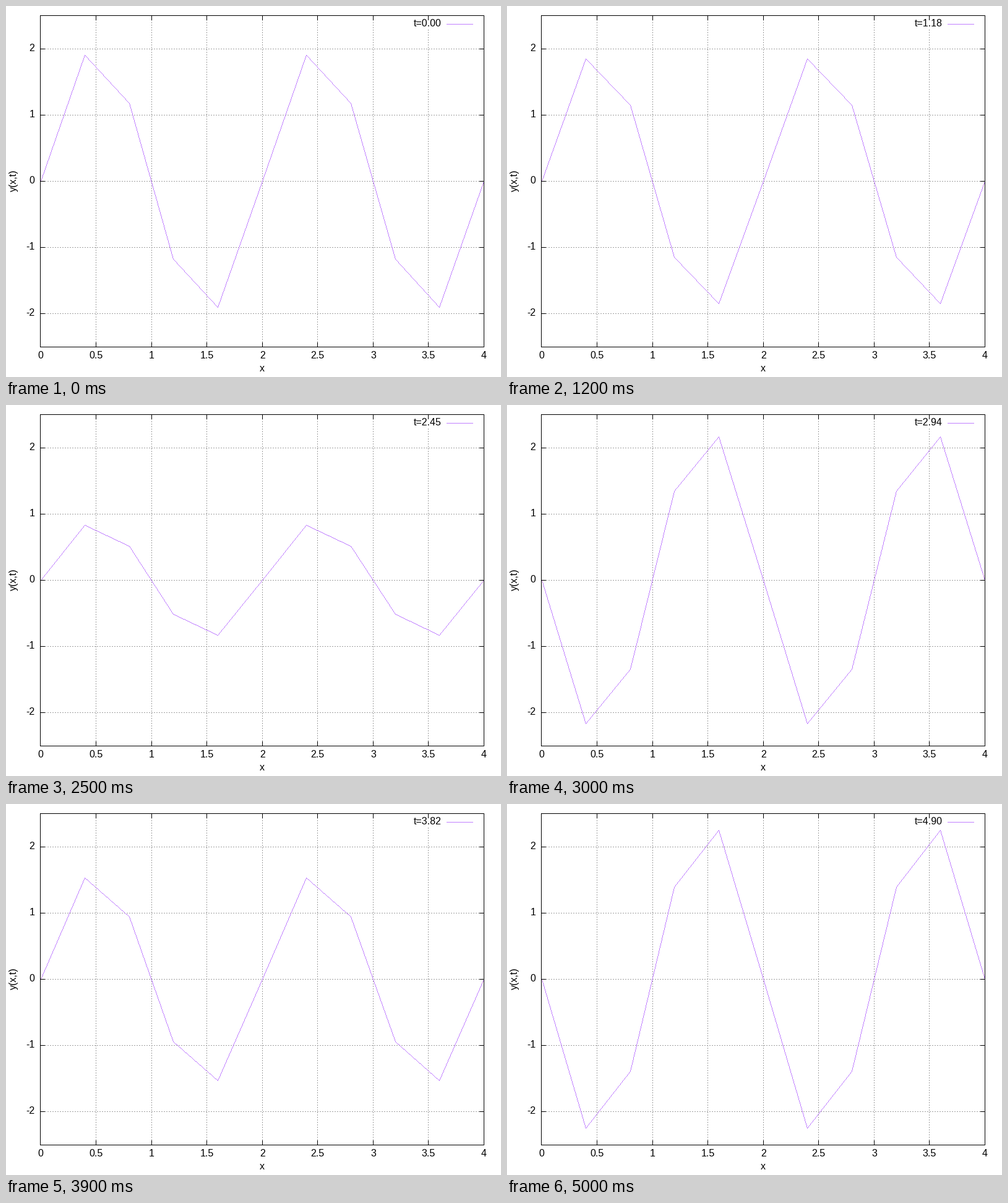
Write a matplotlib script that moves like this. It is 800 by 600 pixels and loops after 5100 ms.

```python
import numpy as np
import matplotlib.pyplot as plt
from matplotlib.animation import FuncAnimation

W, H, DPI = 800, 600, 100
FRAMES, INTERVAL = 51, 100
LEFT, RIGHT, TOP, BOTTOM = 55, 772, 15, 551
PX = 72 / DPI                      # one pixel in points
TICK = 7
INK, GRID, CURVE = "black", "#a0a0a0", "#c080ff"

# Damped, driven string on a coarse grid
DX, DT = 0.4, 0.098
SPEED, DAMPING, FORCE, OMEGA = 4, 6, 175.5, 3 * np.pi


def amplitudes():
    """Amplitude of the first mode at every time step, starting at rest."""
    g = DAMPING * DT / 2
    k = (SPEED * DT / DX) ** 2 * (2 - 2 * np.cos(np.pi * DX))
    a = [2.0, 2 - k]
    for n in range(1, FRAMES - 1):
        push = FORCE * DT**2 * np.sin(OMEGA * n * DT)
        a.append(((2 - k) * a[n] - (1 - g) * a[n - 1] - push) / (1 + g))
    return a


def px(x):
    return np.round(55.5 + (RIGHT - 55.5) * np.asarray(x) / 4)


def py(y):
    return np.round(BOTTOM - (BOTTOM - TOP) * (np.asarray(y) + 2.5) / 5)


def raster(xs, ys):
    """Pixels of a polyline one pixel wide, kept inside the plot border."""
    parts = []
    for x0, y0, x1, y1 in zip(xs, ys, xs[1:], ys[1:]):
        steps = int(max(abs(x1 - x0), abs(y1 - y0))) + 1
        parts.append(np.round(np.linspace((x0, y0), (x1, y1), steps)))
    x, y = np.concatenate(parts).T
    inside = (x > LEFT) & (x < RIGHT) & (y > TOP) & (y < BOTTOM)
    return x[inside], y[inside]


def dashes(x, y):
    """Each pixel as a short horizontal stroke, separated by gaps."""
    gap = np.full_like(x, np.nan)
    return (np.column_stack([x - 0.5, x + 0.5, gap]).ravel(),
            np.column_stack([y, y, gap]).ravel())


plt.rcParams["font.family"] = "Liberation Sans"
plt.rcParams["font.size"] = 16 * PX
plt.rcParams["path.simplify"] = False

fig = plt.figure(figsize=(W / DPI, H / DPI), dpi=DPI, facecolor="white")
ax = fig.add_axes([0, 0, 1, 1])
ax.set_xlim(-0.5, W - 0.5)         # whole numbers are pixel centres
ax.set_ylim(H - 0.5, -0.5)
ax.axis("off")


def line(xs, ys, color=INK, z=4, **kw):
    return ax.plot(xs, ys, color=color, lw=PX, zorder=z, snap=False,
                   solid_capstyle="butt", dash_capstyle="butt",
                   solid_joinstyle="miter", **kw)[0]


def hline(x0, x1, y, *args, **kw):
    line([x0 - 0.5, x1 + 0.5], [y, y], *args, **kw)


def vline(x, y0, y1, *args, **kw):
    line([x, x], [y0 + 0.5, y1 - 0.5], *args, **kw)


def label(x, y, s, ha="center", **kw):
    return ax.text(x, y, s, ha=ha, va="baseline", color=INK, zorder=5, **kw)


DOTS = (0, (2, 2))

for v in np.arange(0, 4.1, 0.5):
    x = px(v) if v else LEFT
    if 0 < v < 4:
        end = 38 if v == 3.5 else TOP        # the key interrupts the grid
        vline(x, BOTTOM, end, GRID, 1, linestyle=DOTS)
        vline(x, TOP + TICK, TOP)
        vline(x, BOTTOM, BOTTOM - TICK)
    label(x, 569.5, f"{v:g}")

for v in range(-2, 3):
    y = py(v)
    hline(LEFT, RIGHT, y, GRID, 1, linestyle=DOTS)
    hline(LEFT, LEFT + TICK, y)
    hline(RIGHT - TICK, RIGHT, y)
    label(46, y + 3.5, f"{v}", ha="right")

for y in (TOP, BOTTOM):
    hline(LEFT, RIGHT, y)
for x in (LEFT, RIGHT):
    vline(x, BOTTOM, TOP)

label(413, 590.5, "x")
label(16.5, 281.5, "y(x,t)", rotation=90, rotation_mode="anchor")

hline(712, 754, 29, CURVE, 3)
clock = label(703, 32.5, "", ha="right")

nodes = DX * np.arange(11)
shape = np.sin(np.pi * nodes)
swing = amplitudes()
string = line([], [], CURVE, 3)


def draw(n):
    string.set_data(*dashes(*raster(px(nodes), py(swing[n] * shape))))
    clock.set_text(f"t={n * DT:.2f}")
    return string, clock


anim = FuncAnimation(fig, draw, frames=FRAMES, interval=INTERVAL,
                     repeat=True, repeat_delay=0)
plt.show()
```
